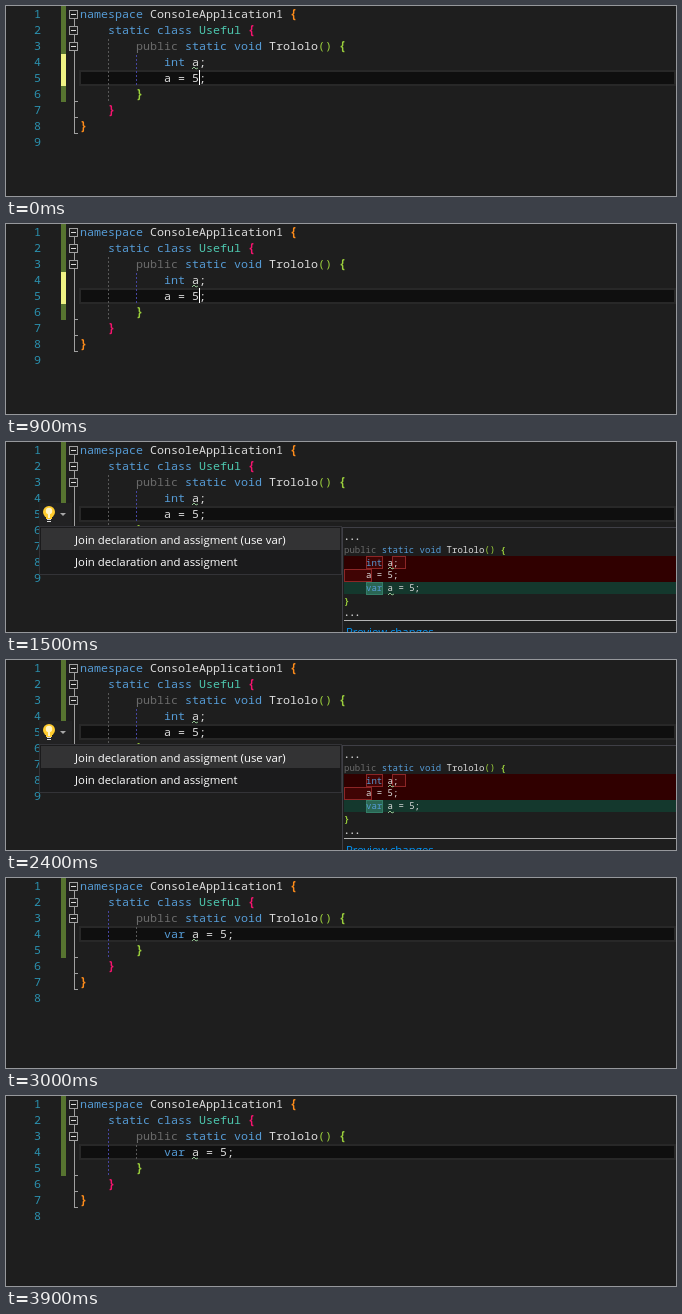
An HTML page with a canvas that plays this animation: 670x190 px, repeating every 4.5 s.

```html
<!DOCTYPE html>
<html lang="en">
<head>
<meta charset="utf-8">
<style>
  html, body { margin: 0; width: 100%; height: 100%; overflow: hidden; background: #1e1e1e; }
  canvas { display: block; }
</style>
</head>
<body>
<canvas id="stage" width="670" height="190"></canvas>
<script>
const ctx = document.getElementById('stage').getContext('2d');
const W = 670, H = 190, ROW = 16, COL = 7, LEFT = 74;
const STEP = 1500;
const BG = '#1e1e1e', PLAIN = '#dcdcdc', KEYWORD = '#569cd6', TYPE = '#4ec9b0', DIM = '#6b6b6b';
const ORANGE = '#ff8c1a', PINK = '#f5146e', LIME = '#9bcf3c', LINE = '#a0a0a0';
const GUIDE = '#585858', ACTIVE_GUIDE = '#4545a0';
const MONO = '"Noto Sans Mono", "DejaVu Sans Mono", monospace';
const CODE_FONT = '500 11.667px ' + MONO;
const PREVIEW_FONT = '500 9px ' + MONO;
const UI_FONT = '11.38px "Open Sans", "Noto Sans", sans-serif';

function rect(x, y, w, h, color) {
  ctx.fillStyle = color;
  ctx.fillRect(x, y, w, h);
}

function frame(x, y, w, h, color, weight = 1) {
  ctx.strokeStyle = color;
  ctx.lineWidth = weight;
  ctx.strokeRect(x + weight / 2, y + weight / 2, w - weight, h - weight);
}

function disc(x, y, r, color) {
  ctx.fillStyle = color;
  ctx.beginPath();
  ctx.arc(x, y, r, 0, Math.PI * 2);
  ctx.fill();
}

function label(text, x, y, color, font) {
  ctx.font = font;
  ctx.fillStyle = color;
  ctx.fillText(text, x, y);
}

// Runs alternate text and color; braces are drawn heavier.
function runs(parts, x, y, font, advance) {
  for (let i = 0; i < parts.length; i += 2) {
    const heavy = /^[{}.]+$/.test(parts[i]);
    label(parts[i], x, y, parts[i + 1], heavy ? font.replace('500', '700') : font);
    x += parts[i].length * advance;
  }
}

function code(row, indent, ...parts) {
  runs(parts, LEFT + indent * COL, row * ROW - 4, CODE_FONT, COL);
}

function guide(x, fromRow, toRow, color) {
  for (let y = (fromRow - 1) * ROW; y < toRow * ROW; y += 4) rect(x, y + 1, 1, 2, color);
}

function squiggle(x, y) {
  ctx.strokeStyle = '#8fbf8f';
  ctx.lineWidth = 1;
  ctx.beginPath();
  ctx.moveTo(x, y + 2);
  ctx.lineTo(x + 2, y);
  ctx.lineTo(x + 4, y + 2);
  ctx.lineTo(x + 6, y + 1);
  ctx.stroke();
}

function outline(last) {
  rect(68, 8, 1, last * ROW - 9, LINE);
  for (let row = 1; row <= 3; row++) {
    const y = row * ROW - 12;
    rect(63, y, 9, 9, BG);
    frame(63, y, 9, 9, LINE);
    rect(65, y + 4, 5, 1, PLAIN);
  }
  for (let row = last - 2; row <= last; row++) rect(68, row * ROW - 1, 4, 1, LINE);
}

function editor(joined, unsaved) {
  const end = joined ? 5 : 6, currentY = (end - 2) * ROW;
  rect(0, 0, W, H, BG);
  rect(73, currentY, W - 73, ROW, '#0f0f0f');
  frame(73, currentY, W - 73, ROW, '#282828', 2);
  rect(55, 0, 5, end * ROW, '#577430');
  if (unsaved) rect(55, 48, 5, 32, '#eff284');
  for (let n = 1; n <= end + 3; n++) label(String(n), 28, n * ROW - 4, '#2b91af', CODE_FONT);
  outline(end + 2);
  guide(102, 3, end, joined ? ACTIVE_GUIDE : GUIDE);
  guide(130, 4, end - 1, joined ? GUIDE : ACTIVE_GUIDE);

  code(1, 0, 'namespace', KEYWORD, ' ConsoleApplication1 ', PLAIN, '{', ORANGE);
  code(2, 4, 'static class ', KEYWORD, 'Useful ', TYPE, '{', PINK);
  code(3, 8, 'public', DIM, ' static void ', KEYWORD, 'Trololo', PLAIN, '() ', LIME, '{', LIME);
  if (joined) {
    code(4, 12, 'var', KEYWORD, ' a = 5;', PLAIN);
  } else {
    code(4, 12, 'int', KEYWORD, ' a;', PLAIN);
    code(5, 12, 'a = 5;', PLAIN);
  }
  squiggle(186, 61);
  code(end, 8, '}', LIME);
  code(end + 1, 4, '}', PINK);
  code(end + 2, 0, '}', ORANGE);
}

function lightbulb() {
  rect(33, 61, 33, 23, '#222223');
  disc(43, 70, 6, '#ffcc2e');
  rect(40, 73, 6, 4, '#ffcc2e');
  disc(43, 69, 3.2, '#fff3c4');
  rect(42, 70, 2, 6, '#fff3c4');
  rect(41, 77, 4, 1, PLAIN);
  rect(41, 79, 4, 1, PLAIN);
  ctx.fillStyle = '#a8a8a8';
  ctx.beginPath();
  ctx.moveTo(54, 71);
  ctx.lineTo(60, 71);
  ctx.lineTo(57, 74);
  ctx.fill();
}

function menu() {
  rect(33, 84, 303, 49, '#1b1b1c');
  frame(33, 84, 303, 49, '#333337');
  rect(35, 86, 299, 22, '#333334');
  label('Join declaration and assigment (use var)', 69, 102, '#ffffff', UI_FONT);
  label('Join declaration and assigment', 69, 124, '#ffffff', UI_FONT);
}

function changedSpan(x, y, w, fill, edge) {
  rect(x, y, w, 13, fill);
  frame(x, y, w, 13, edge);
}

function preview() {
  const left = 336, x = 338, inner = 360, advance = 5.4;
  const line = (startX, y, ...parts) => runs(parts, startX, y, PREVIEW_FONT, advance);
  rect(left, 85, W - left, H - 85, BG);
  rect(left, 85, W - left, 1, '#3f3f46');
  rect(left, 85, 1, H - 85, '#3f3f46');
  rect(x, 114, W - x, 26, '#300000');
  rect(x, 140, W - x, 12, '#14382d');
  changedSpan(360, 114, 17, '#400404', '#8c2626');
  changedSpan(386, 114, 14, '#400404', '#8c2626');
  changedSpan(338, 127, 28, '#400404', '#8c2626');
  changedSpan(360, 140, 17, '#2a6654', '#347d67');

  line(x, 98, '...', PLAIN);
  line(x, 111, 'public', DIM, ' static void ', KEYWORD, 'Trololo', PLAIN, '() ', LIME, '{', LIME);
  line(inner, 124, 'int', KEYWORD, ' a;', PLAIN);
  line(inner, 136, 'a = 5;', PLAIN);
  line(inner, 149, 'var', KEYWORD, ' a = 5;', PLAIN);
  squiggle(382, 125);
  squiggle(382, 151);
  line(x, 162, '}', LIME);
  line(x, 174, '...', PLAIN);
  rect(x, 178, W - x, 1, '#b4b4b4');
  label('Preview changes', 340, 194, '#0097fb', UI_FONT);
}

const scenes = [
  () => { editor(false, true); rect(193, 64, 1, 15, '#ffffff'); },
  () => { editor(false, false); lightbulb(); menu(); preview(); },
  () => editor(true, false)
];

const start = performance.now();
function tick() {
  const elapsed = performance.now() - start;
  scenes[Math.floor(elapsed / STEP) % scenes.length]();
  requestAnimationFrame(tick);
}
tick();
</script>
</body>
</html>
```
